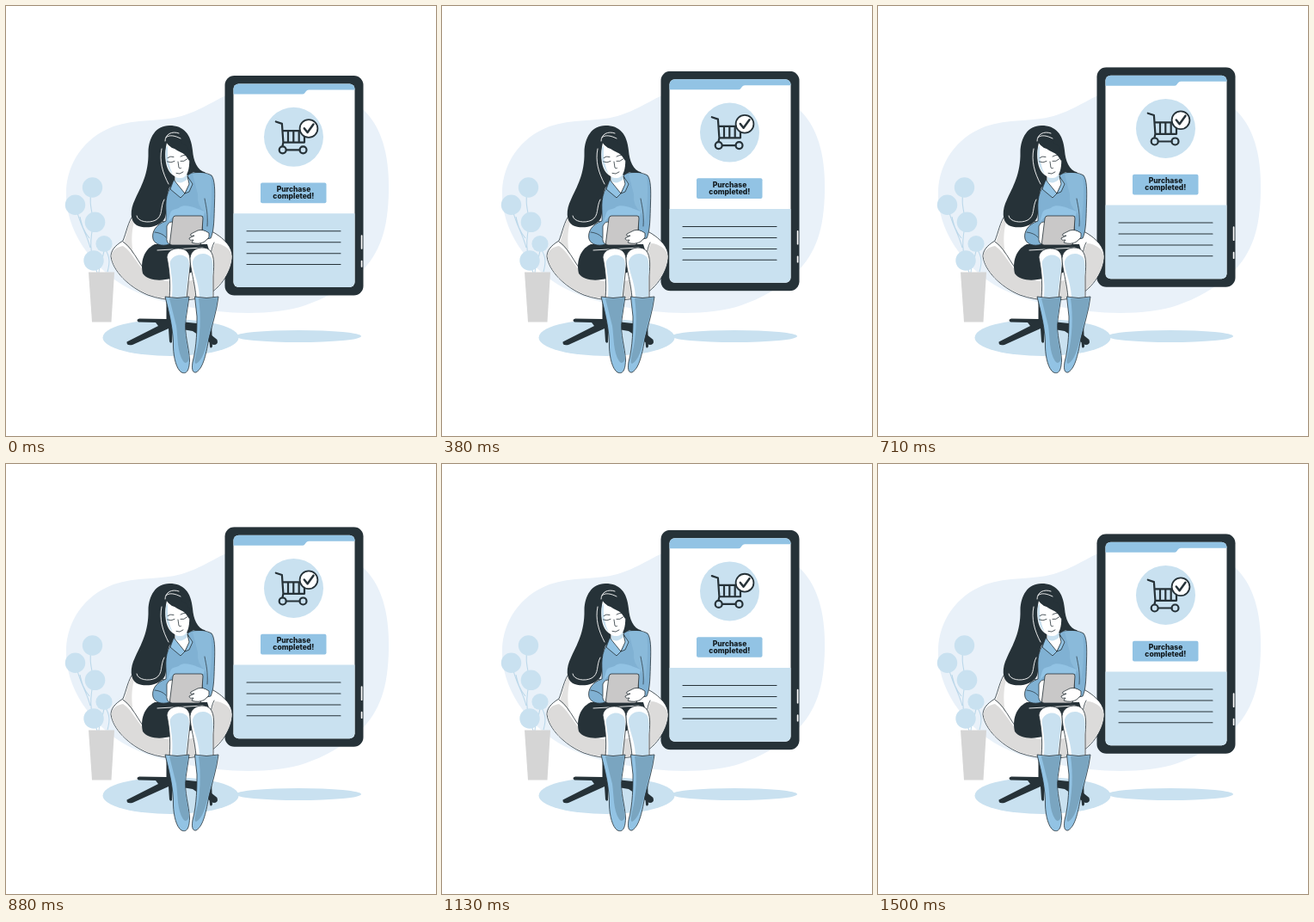
An HTML page for the animation above (1540 ms loop, 500 px wide and 500 px high).

```html
<!DOCTYPE html>
<html lang="en">
<head>
<meta charset="utf-8">
<title>Purchase completed</title>
<style>
  html, body { margin: 0; width: 100%; height: 100%; overflow: hidden; background: #fff; }
  svg { display: block; width: 100vw; height: 100vh; }
  .ink { fill: #263238; }
  .pale { fill: #c9e1f0; }
  .sky { fill: #92c3e4; }
  .blue { fill: #80b1d3; }
  .dusk { fill: #7aa5c0; }
  .white { fill: #fff; }
  .line { fill: none; stroke: #263238; stroke-linecap: round; stroke-linejoin: round; }
  .edge { stroke: #263238; stroke-width: .8; stroke-linejoin: round; }
  .shine { fill: none; stroke: #fff; stroke-width: .9; stroke-linecap: round; }
  .label { font: 800 8.5px Inter, sans-serif; fill: #10181c; text-anchor: middle; }
  #device { animation: float 1540ms linear infinite; }
  @keyframes float {
    0%, 100% { transform: translateY(0); }
    47% { transform: translateY(-10px); }
    95.5% { transform: translateY(.35px); }
  }
</style>
</head>
<body>
<svg viewBox="0 0 500 500">
  <defs>
    <clipPath id="screen"><rect x="264.5" y="90.5" width="141" height="236.5" rx="6"/></clipPath>
  </defs>

  <path fill="#e9f1f9" d="M70 215C71 184 90 153 125 140C151 131 179 135 204 128C234 119 248 104 277 96C325 83 388 94 417 122C440 145 446 181 445 217C444 258 436 287 411 311C391 329 371 340 348 348C322 357 282 359 246 355C205 350 165 342 135 324C101 303 68 261 70 215Z"/>
  <ellipse class="pale" cx="191.500" cy="385.500" rx="79" ry="21.500"/>
  <ellipse class="pale" cx="340" cy="384" rx="73" ry="7"/>

  <g id="plant">
    <path fill="none" stroke="#bcd8ea" stroke-width="1.100" d="M106 310C96 285 98 270 102 251C99 236 96 225 100 211M98 281C93 262 85 254 81 232M97 270C90 262 88 254 86 245M108 310C109 295 116 290 114 276M118 309C121 298 121 292 115 282"/>
    <g class="pale">
      <circle cx="100.500" cy="211" r="11.700"/>
      <circle cx="80.500" cy="231.300" r="11.700"/>
      <circle cx="103.500" cy="251.300" r="11.800"/>
      <circle cx="114" cy="276.500" r="9.600"/>
      <circle cx="102" cy="296" r="11.700"/>
    </g>
    <path fill="#d5d5d5" d="M96 309.500H126L122.500 367.500H100Z"/>
  </g>

  <g id="device">
    <rect class="ink" x="254.500" y="81" width="161" height="255.500" rx="11"/>
    <g clip-path="url(#screen)">
      <path class="white" d="M264 90H406V328H264Z"/>
      <path class="sky" d="M264 90H406V97.500H352Q350 97.500 349 99L347.500 101Q346.500 102.500 344.500 102.500H264Z"/>
      <path class="pale" d="M264 241.300H406V328H264Z"/>
    </g>
    <path stroke="#fff" stroke-width="1.700" stroke-linecap="round" d="M413.600 267V282M413.600 296.500V303"/>
    <circle class="pale" cx="334.500" cy="152.300" r="34.500"/>
    <g class="line" stroke-width="2.200">
      <path d="M313.800 134.500L320.900 136.900L322.400 158.600H347V152M322 145.200H343M328 146V158M334.300 146V158M340.700 146V158M322.400 158.600L321.500 163"/>
      <circle cx="321.700" cy="167.300" r="4"/>
      <circle cx="345.500" cy="167.300" r="4"/>
      <path d="M326 167.300H341.500"/>
      <circle cx="352" cy="142.500" r="10.400" style="fill:#fff" stroke-width="1.800"/>
      <path stroke-width="2.500" d="M346.800 142.300L350.600 147L357.500 137.500"/>
    </g>
    <rect class="sky" x="296" y="205.500" width="76.500" height="23.700" rx="2"/>
    <text class="label" x="334.500" y="215.900">Purchase</text>
    <text class="label" x="334.300" y="224.200">completed!</text>
    <path class="line" stroke-width="1.100" stroke-linecap="butt" d="M280 261.800H389M280 274.800H389M280 287.800H389M280 300.500H389"/>
  </g>

  <g id="chair">
    <path class="ink" d="M186.500 338H193V366L222 369L245.500 388Q247.500 394 241 394L217 378L193.500 374L193 391Q191 393 190 390L189 375L147 394Q140 395.500 140.500 390.500L177 372L174 368L154 367.500Q150.500 365 155 363.500L186.500 364Z"/>
    <path class="ink" d="M235 369H239L240 396Q238 399 237 396Z"/>
    <path class="edge" fill="#fff" d="M148 243C142 251 140 263 136 273C131 276 122 282 122 291C124 308 143 327 165 336C187 344 216 344 232 337C251 328 263 306 263 291C263 281 255 271 241 263L180 250Z"/>
    <path fill="#dcdbda" d="M122.500 290C124 283 130 280 136 279C149 287 155 309 172 316C190 323 217 323 229 313C240 303 237 286 243 276C252 276 262 283 262.500 291C262 306 250 328 232 336C216 343 187 343 165 335C143 326 124 308 122.500 290Z"/>
    <path fill="#e3e2e1" d="M147.500 245C142 254 141 264 137 275C142 280 146 284 148 289C145 273 146 257 151 246Z"/>
    <path class="line" stroke-width=".8" d="M136 274C151 284 156 308 172 316M242 275C237 283 238 302 231 312"/>
  </g>

  <g id="woman">
    <path class="ink" d="M173 277C160 283 156 298 159 311C166 321 183 319 192 317L215 310L238 290L234 277Z"/>

    <path class="ink" d="M190 139C174 139 166 153 165.500 170C166 195 157 210 150 225C144 237 144 250 152 255C162 260 180 257 185 246C188 236 185 224 190 211L218 193C223 196 229 196 232 193.500C222 191 218 180 217 168C215 149 207 139 190 139Z"/>

    <path class="edge blue" d="M191 211C193 205 196 203 200 203L216 194C226 193 234 194 239 197C243 202 243 215 242.500 229C242 246 242 262 238 270L229 272L228 244H196L190 277C181 280 173 277 171 271C169 263 174 254 186 250C187 237 183 226 191 211Z"/>
    <path fill="#8abada" d="M217 195Q231 192 238 198C240 212 239 235 236 251L231 239Q222 233 223 219Z"/>
    <path class="sky" d="M191 241C193 235 199 237 202 234C209 229 223 236 231 239L230 244H196L188 251Z"/>
    <path class="line" stroke-width=".7" d="M231 224C233 235 235 242 234 256M173 263Q182 264 186 269"/>

    <path class="white edge" d="M196 197V208L208 218L214 207L210 194Z"/>
    <path class="pale" d="M197 199Q204 202 210 194L211 201Q204 208 197 204Z"/>
    <path class="edge sky" d="M195 202L208 218L203 223L191 213ZM211 198L217 207L213 216L208 218L213 207Z"/>
    <path class="white" d="M187 159C184 171 185 184 189 191C193 198 202 202 207 199C212 196 214 186 213 174Q199 170 187 159Z"/>
    <path class="pale" d="M187 162C184 171 186 184 190 191L194 196Q187 182 188 164Z"/>
    <path class="ink" d="M186 153Q185 160 193 165Q206 167 213 180L216 177C214 162 201 154 186 153Z"/>
    <path class="line" stroke-width=".8" d="M187.500 181Q192 183 196 180.500M203 180.500Q207 181.500 210.500 178M188 176.500Q191 174 195 175.500M203 175Q206 173 209 173.500M200 181L201 188Q202 189.500 203.500 188.500M198 194.500Q202 196.500 206 193"/>
    <path class="shine" d="M185 157C185 149 193 145 201 148M186 153C190 149 197 151 203 154M181 166C178 180 182 194 189 207M152 244C153 251 166 253 174 249C183 244 179 234 184 225"/>

    <path class="white edge" d="M187 256Q190 249 195 252L193 262L191 277Q186 276 187 268Z"/>
    <path class="edge" fill="#c9c8c8" d="M197 244H227Q229 244 229 247L227 275Q227 278 224 278H193Q190 278 190.500 275L194 247Q194.500 244 197 244Z"/>
    <path class="white edge" d="M236 264Q229 259 223 261L215 265Q213 268 219 267L213 270Q213 273 218 272L216 275Q224 278 231 274L236 269Z"/>
    <path class="line" stroke-width="1" d="M168 282.500L228 279"/>
    <path class="shine" stroke-width=".7" d="M176 284L229 281"/>

    <path class="white edge" d="M190 340C192 319 189 302 187 292C188 283 198 280 207 283C214 286 215 294 214 303L210 340Z"/>
    <path class="pale" d="M193 339C195 316 190 306 191 297C196 287 208 288 212 295Q214 301 212 311L209 339Z"/>
    <path class="white edge" d="M221 340C220 322 214 306 214 293C215 283 225 279 234 282C243 286 242 301 241 313L241 340Z"/>
    <path class="pale" d="M225 339C224 319 216 306 217 297C220 287 233 285 239 293Q242 302 240 315L240 339Z"/>

    <g class="edge">
      <path class="sky" d="M185 338Q199 341 213 338L209 365C207 382 213 397 213.500 412C213 426 209 428 204 426C198 422 195 409 194.500 397C195 379 190 358 185 338Z"/>
      <path class="sky" d="M219.500 338Q233 341 247 338C245 354 240 370 236 386C233 402 230 421 221 426C216 427 216 420 217 414C222 396 222 374 222 361Z"/>
    </g>
    <path class="dusk" d="M190 340Q202 341 212 339L208.500 365C206 382 212 397 213 410Q210 418 206 413C199 402 200 386 198 372Q194 356 190 340Z"/>
    <path class="dusk" d="M224 340Q235 341 246 339C244 354 239 370 235 386C232 398 229 412 221 416Q218 416 221 404C226 386 227 360 224 340Z"/>
  </g>
</svg>
</body>
</html>
```
